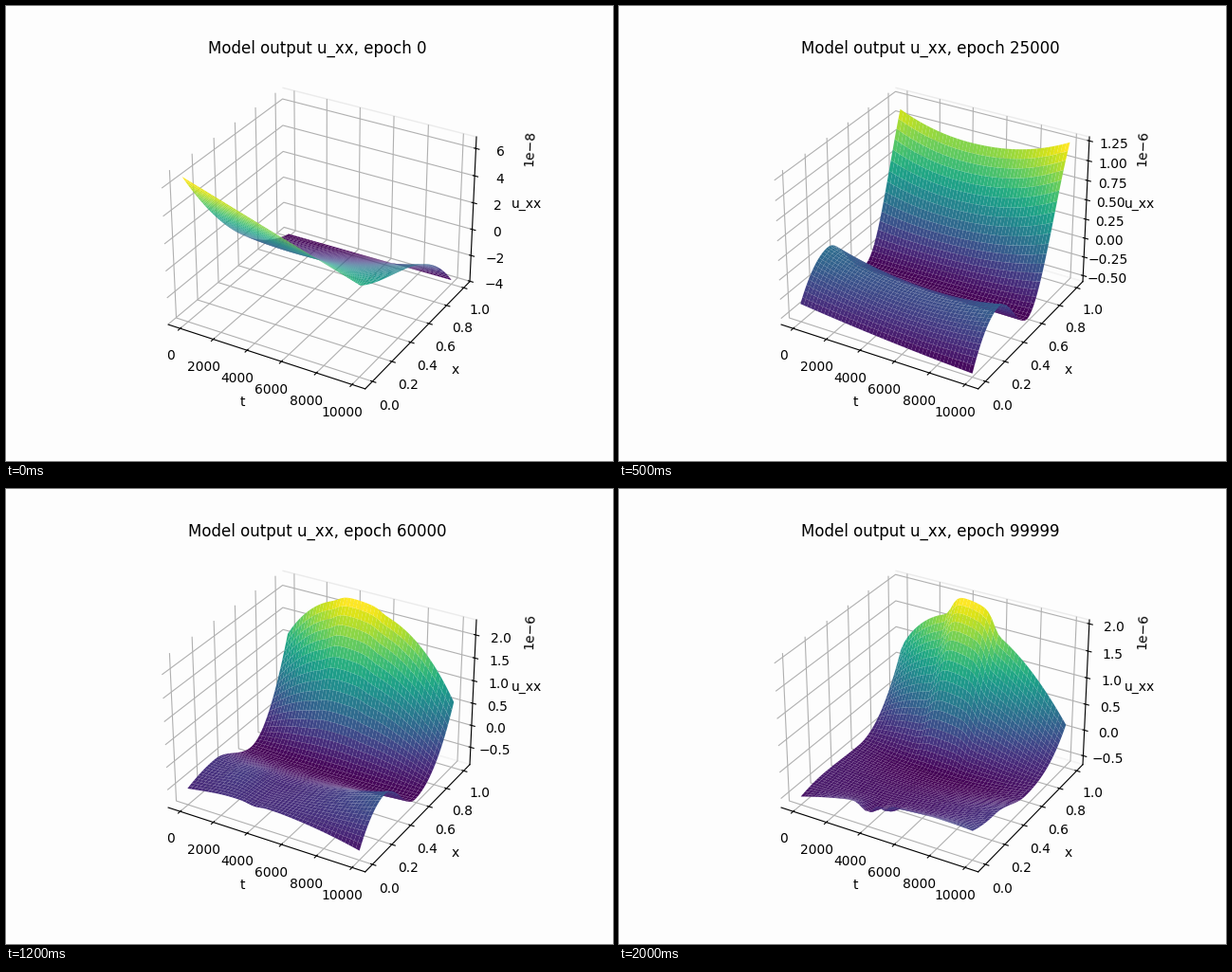
Animation, 640 px wide and 480 px high, one loop 2.1 s. Source, as a matplotlib script:

```python
import numpy as np
import matplotlib.pyplot as plt
from matplotlib.animation import FuncAnimation
from matplotlib.colors import to_rgba

BG = "#fdfdfd"
FRAMES, INTERVAL = 21, 100
T_MAX = 10000
CELLS = 50

# value range of the trained surface over training progress
RANGE_P = (0.15, 0.25, 0.4, 0.5, 0.75, 1)
RANGE_LO = (-0.613, -0.543, -0.986, -0.941, -0.675, -0.619)
RANGE_HI = (1.066, 1.262, 2.037, 2.23, 2.30, 2.017)

t = np.linspace(0, 1, CELLS)
x = t[:, None]


def ease(u):
    u = np.clip(u, 0, 1)
    return u * u * (3 - 2 * u)


def bell(u, center, width, power=2):
    return np.exp(-np.abs((u - center) / width) ** power)


def mix(a, b, k):
    return a + (b - a) * k


def scaled(s, lo, hi):
    return mix(lo, hi, (s - s.min()) / np.ptp(s))


def untrained():
    left = 1 - 1.75 * x + 0.76 * x ** 2
    right = 0.62 - 0.6 * x + 0.85 * x ** 2 * (1 - x)
    sag = 0.28 * t * (1 - t) * np.sin(np.pi * x)
    return scaled(mix(left, right, t) - sag, -3.81e-8, 6.62e-8)


def trained(p):
    """Ridge, valley and far slope at training progress p."""
    late = np.clip(2 * p - 1, 0, 1)
    fall = 1 - np.exp(-max(p - 0.4, 0) / 0.14)
    dip = bell(p, 0.25, 0.08)
    arch = 4 * t * (1 - t)

    # heights along t of the four lines that carry the surface
    front = mix(0.13 - 0.07 * late, 0.03 + 0.18 * late, t)
    front = front + (0.06 - 0.07 * dip) * arch
    crest = mix(0.36 - 0.27 * ease((p - 0.3) / 0.45),
                0.31 - 0.14 * ease((p - 0.5) / 0.4), t)
    crest = crest - (0.09 - 0.03 * late) * arch
    valley = 0.02 + 0.08 * bell(p, 0.15, 0.06) + 0.06 * late * (1 - arch)

    left = 0.96 - 0.43 * fall - 0.05 * dip
    right = 0.98 - 0.67 * fall
    top = 0.97 - 0.16 * dip - 0.08 * late ** 2
    q = 2 + 2 * bell(p, 0.45, 0.12)
    dome = 1 - np.abs(2 * t ** (1 - 0.15 * late) - 1) ** q
    back = mix(left, right, t) + (top - (left + right) / 2) * dome
    back = back + 0.13 * late * bell(t, 0.44, 0.13, 6)

    # blend the lines along x
    xc = 0.27 - 0.04 * late
    xv = 0.62 - 0.06 * t * (1 - p) - 0.06 * late
    a, b, c = x / xc, (x - xc) / (xv - xc), (x - xv) / (1 - xv)
    m = 3.4 - 2.5 * back
    near = mix(crest, front, (1 - a) ** 2)
    mid = mix(crest, valley, ease(b))
    far = mix(valley, back, c * c * (3 - m + (m - 2) * c))
    s = np.where(x < xc, near, np.where(x < xv, mid, far))

    # late ripples near the front edge
    edge = bell(x, 0, 0.12)
    s = s - 0.07 * late * edge * (bell(t, 0.4, 0.05)
                                  + 0.6 * late * bell(t, 0.5, 0.025))
    s = s + 0.3 * late * (1 - late) * bell(t, 0.22, 0.12) * bell(x, 0.2, 0.14)
    return scaled(s, 1e-6 * np.interp(p, RANGE_P, RANGE_LO),
                  1e-6 * np.interp(p, RANGE_P, RANGE_HI))


def surface(n):
    p = n / (FRAMES - 1)
    start = RANGE_P[0]
    return mix(untrained(), trained(max(p, start)), min(p / start, 1))


def padded(lo, hi, margin):
    pad = (hi - lo) * margin
    return lo - pad, hi + pad


fig = plt.figure(figsize=(6.4, 4.8), dpi=100, facecolor=BG)
ax = fig.add_subplot(projection="3d", facecolor=BG)
for axis, edge in ((ax.xaxis, BG), (ax.yaxis, "#ebebeb"), (ax.zaxis, "#f4f4f4")):
    axis.set_pane_color(to_rgba(BG))
    axis.pane.set_edgecolor(edge)
ax.set_xlabel("t")
ax.set_ylabel("x")
ax.set_zlabel("u_xx")

SIDE = 0.05 + 1.1 / 48
ax.set_xlim(*padded(0, T_MAX, SIDE))
ax.set_ylim(*padded(0, 1, SIDE))
T, X = np.meshgrid(t * T_MAX, t)
drawn = []


def update(n):
    while drawn:
        drawn.pop().remove()
    z = surface(n)
    drawn.append(ax.plot_surface(T, X, z, rstride=1, cstride=1, cmap="viridis"))
    ax.set_zlim(*padded(z.min(), z.max(), 1 / 48))
    ax.set_title(f"Model output u_xx, epoch {min(5000 * n, 99999)}")
    return drawn


anim = FuncAnimation(fig, update, frames=FRAMES, interval=INTERVAL,
                     repeat=True, repeat_delay=0, blit=False)
plt.show()
```
